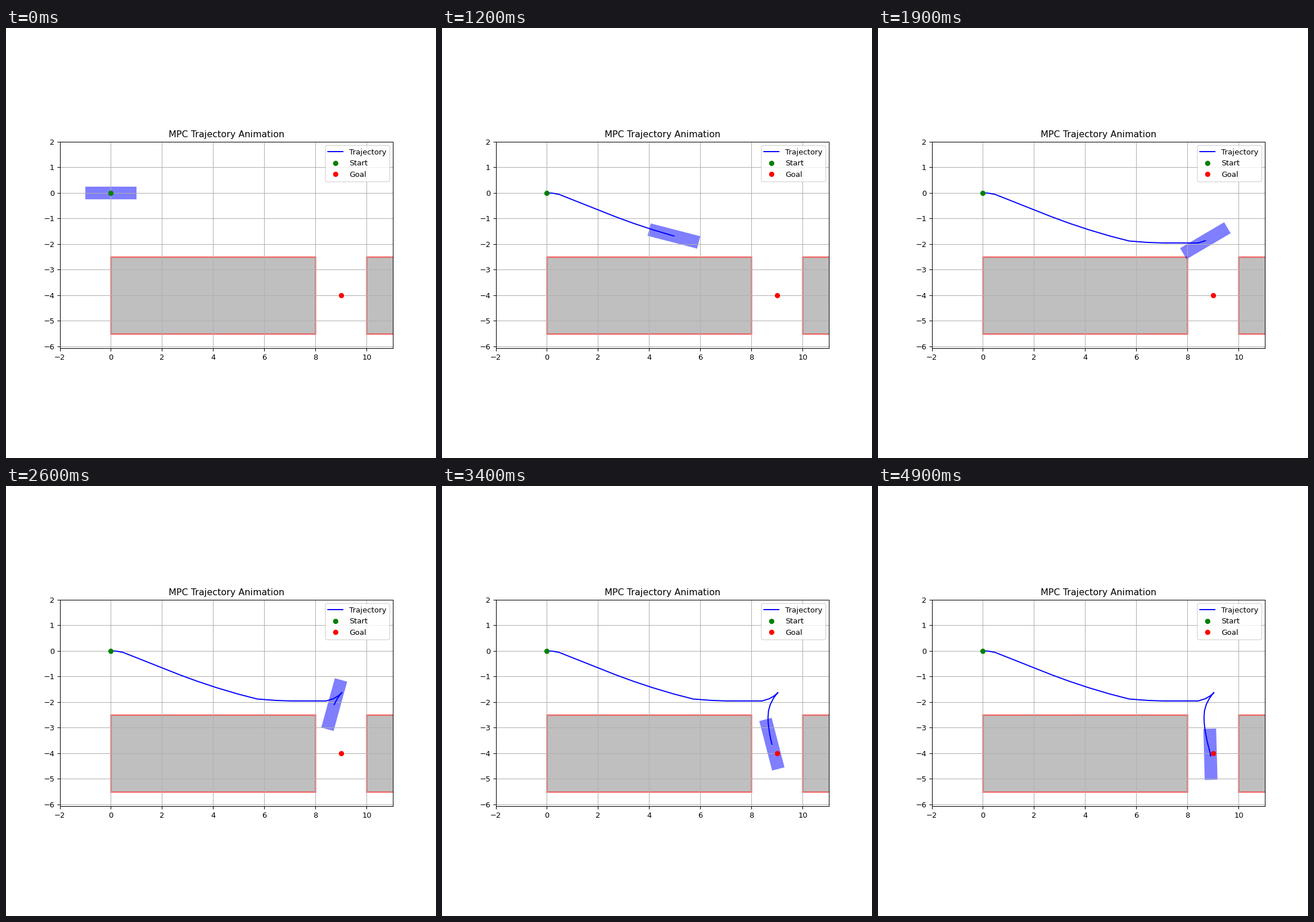
Recreate the animation shown at these times as a matplotlib script. Size 748 by 748 pixels, loop 5100 ms.

```python
import numpy as np
import matplotlib.pyplot as plt
from matplotlib.animation import FuncAnimation
from matplotlib.patches import Rectangle

LENGTH, WIDTH = 2.0, 0.5
FULL_LOCK = 45  # degrees turned per unit driven


def phases(*pairs):
    """Expand (steps, value) pairs into one value per step."""
    counts, values = zip(*pairs)
    return np.repeat(values, counts)


def running_total(values):
    return np.concatenate([[0], np.cumsum(values)])


# Speed up, brake through zero into reverse, slow down, creep forward.
accel = phases((10, 0.08), (1, 0.059), (14, -0.08), (1, 0), (3, 0.012),
               (4, 0.03), (10, 0.0105), (6, 0.0045))

# Swing right, drive straight, level out, then full lock into the gap.
turn = phases((4, -FULL_LOCK), (4, 0), (4, 2.35), (1, 13), (2, 3.3), (2, 0),
              (10, FULL_LOCK), (2, 22), (5, 9), (3, 0), (12, -FULL_LOCK))

step = running_total(accel)[:-1]
heading = running_total(turn * np.abs(step))
theta = np.radians(heading[:-1])
x = running_total(step * np.cos(theta))
y = running_total(step * np.sin(theta))
last = len(x) - 1

fig, ax = plt.subplots(figsize=(8, 8), dpi=93.5)
ax.set_xlim(-2, 11.03)
ax.set_ylim(-6.08, 2)
ax.set_aspect("equal")
ax.set_xticks(range(-2, 11, 2))
ax.set_yticks(range(-6, 3))
ax.grid(True)
ax.set_title("MPC Trajectory Animation")

for left in (0, 10):
    ax.add_patch(Rectangle((left, -5.5), 8, 3, facecolor="gray",
                           edgecolor="red", linewidth=2, alpha=0.5))

car = ax.add_patch(Rectangle((-LENGTH / 2, -WIDTH / 2), LENGTH, WIDTH,
                             rotation_point="center", facecolor="blue",
                             edgecolor="none", alpha=0.5))
path, = ax.plot([], [], "b-", label="Trajectory")
ax.plot(0, 0, "go", label="Start")
ax.plot(9, -4, "ro", label="Goal")
ax.legend(loc="upper right")


def update(frame):
    i = min(frame, last)
    path.set_data(x[:i + 1], y[:i + 1])
    car.set_xy((x[i] - LENGTH / 2, y[i] - WIDTH / 2))
    car.set_angle(heading[i])
    return path, car


anim = FuncAnimation(fig, update, frames=51, interval=100, repeat=True)
plt.show()
```
